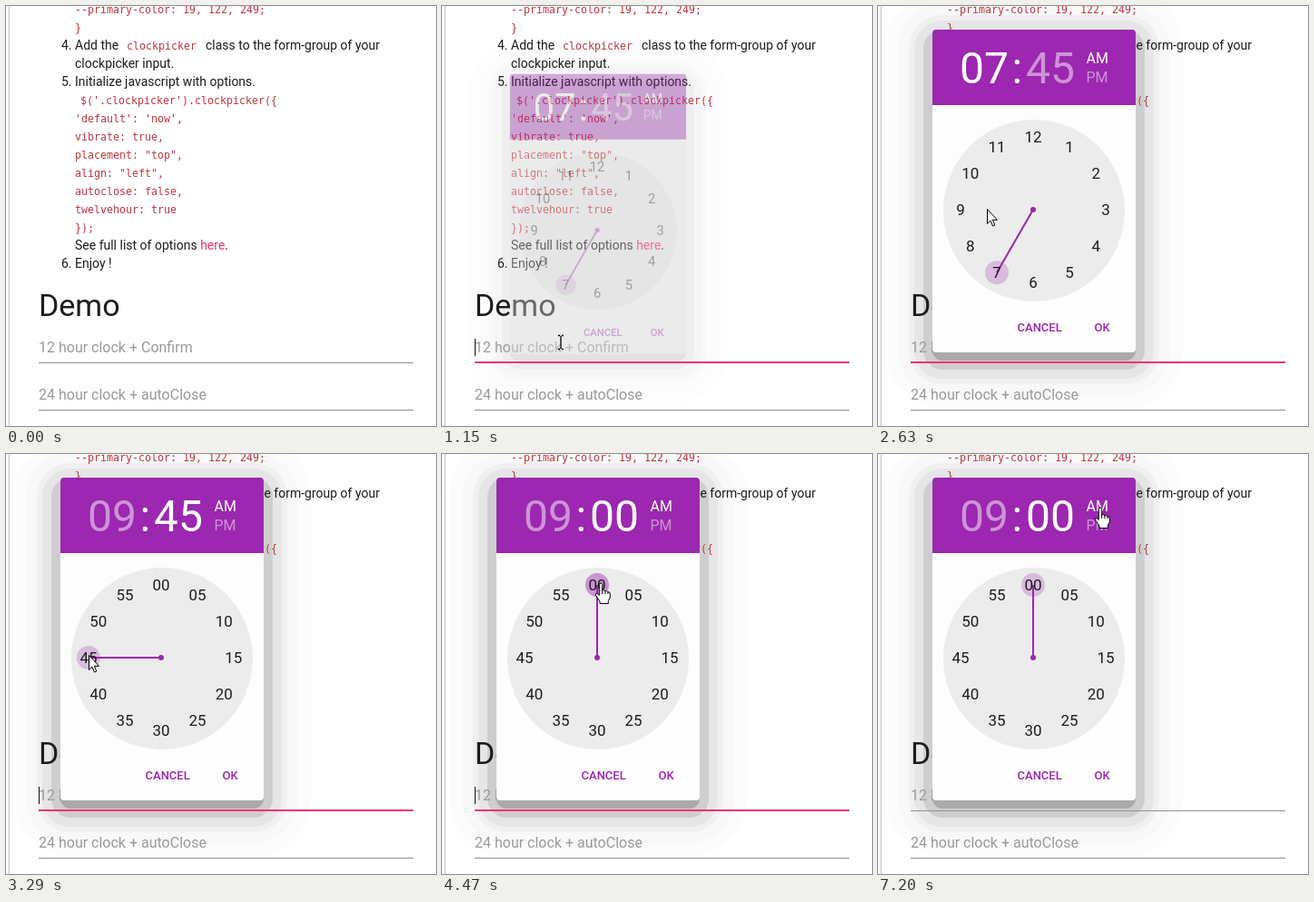
An HTML page for the animation above (8 s loop, 474 by 462 pixels).

```html
<!DOCTYPE html>
<html lang="en">
<head>
<meta charset="utf-8">
<title>Clock picker demo</title>
<style>
html, body { margin: 0; width: 100%; height: 100%; overflow: hidden; background: #fff; }
svg { display: block; width: 474px; height: 462px; font-family: Roboto, sans-serif; }
.list { font-size: 14px; fill: #1c1c1c; }
.code { font: 11.63px "DejaVu Sans Mono", monospace; fill: #bd383f; white-space: pre; }
.hint { font-size: 16px; fill: #999; }
.big { font-size: 48px; fill: #fff; }
.half { font-size: 16px; fill: #fff; }
.tick { font-size: 17px; fill: #1c1c1c; text-anchor: middle; }
.btn { font-size: 13px; font-weight: 500; fill: #9c27b0; }
</style>
</head>
<body>
<svg viewBox="0 0 474 462" xmlns="http://www.w3.org/2000/svg">
  <g id="shadow"></g>
  <path d="M2.5 0V462" stroke="#eee"/>
  <path d="M3.5 0V462" stroke="#ccc"/>
  <g id="code" class="code"></g>
  <g class="list">
    <text x="61" y="48">4.</text><text x="76" y="48">Add the</text>
    <text x="220" y="48">class to the form-group of your</text>
    <text x="76" y="68">clockpicker input.</text>
    <text x="61" y="88">5.</text><text x="76" y="88">Initialize javascript with options.</text>
    <text x="76" y="268">See full list of options <tspan fill="#ec2f73">here</tspan>.</text>
    <text x="61" y="288">6.</text><text x="76" y="288">Enjoy !</text>
  </g>
  <text x="36" y="341" font-size="34" fill="#1c1c1c">Demo</text>
  <g class="hint">
    <text x="36" y="381">12 hour clock + Confirm</text>
    <text x="36" y="433">24 hour clock + autoClose</text>
  </g>
  <path d="M36 392.5H449M36 444.5H449" stroke="#929292"/>
  <rect id="focus" y="391" height="2" fill="#f03573"/>
  <path id="caret" d="M36.5 366V385" stroke="#111"/>

  <g id="pop">
    <rect x="60" y="26" width="224" height="355" rx="4" fill="#fdfdfd"/>
    <path d="M60 109V30a4 4 0 0 1 4-4H280a4 4 0 0 1 4 4V109z" fill="#9c27b0"/>
    <text id="hour" class="big" x="90" y="85"></text>
    <text class="big" x="147.500" y="85">:</text>
    <text id="minute" class="big" x="163" y="85"></text>
    <text id="am" class="half" x="229.500" y="63">AM</text>
    <text id="pm" class="half" x="229.500" y="84">PM</text>
    <circle cx="172" cy="225" r="100" fill="#ececec"/>
    <circle id="hover" r="13" fill="#9c27b0" opacity=".25"/>
    <circle id="knob" r="13" fill="#9c27b0" opacity=".25"/>
    <path id="needle" stroke="#9c27b0" stroke-width="2"/>
    <circle cx="171" cy="224" r="3" fill="#9c27b0"/>
    <g id="hours" class="tick"></g>
    <g id="minutes" class="tick"></g>
    <text class="btn" x="153.500" y="358">CANCEL</text>
    <text class="btn" x="238.500" y="358">OK</text>
  </g>

  <g id="cursor" stroke-linejoin="round">
    <path id="beam" d="M-3-7.500H-.8M3-7.500H.8M0-7V7M-3 7.500H-.8M3 7.500H.8" stroke="#000" stroke-width="1.300"/>
    <path id="arrow" d="M.5.5V16.500L4 13.200L6.500 19L8.800 18L6.300 12.300H11.500Z" fill="#fff" stroke="#000"/>
    <path id="hand" d="M-1.700 13.500V1.700a1.700 1.700 0 0 1 3.400 0V8q2-1 3.200.8q2-.8 3 .9q2.400-.4 2.400 2.300V16l-2 3.500V22.500H-1V20L-5.500 13.500q-.6-2.400 1.400-2.300zM1.700 8V12M4.900 9V12M7.900 10V12" fill="#fff" stroke="#000"/>
  </g>
</svg>
<script>
const LOOP = 8000, CX = 171, CY = 224, R = 80;
const $ = id => document.getElementById(id);
const set = (id, attrs) => { for (const k in attrs) $(id).setAttribute(k, attrs[k]); };
const show = (id, on) => { $(id).style.display = on ? '' : 'none'; };
const ramp = (t, start, span) => Math.min(1, Math.max(0, (t - start) / span));
const smooth = p => p * p * (3 - 2 * p);
const zoom = (x, y, s) => `translate(${x} ${y}) scale(${s}) translate(${-x} ${-y})`;

function add(parent, tag, attrs, text) {
  const el = document.createElementNS('http://www.w3.org/2000/svg', tag);
  for (const k in attrs) el.setAttribute(k, attrs[k]);
  if (text) el.textContent = text;
  $(parent).append(el);
}

function spot(i) {
  const a = i * Math.PI / 6;
  return [CX + R * Math.sin(a), CY - R * Math.cos(a)];
}

add('code', 'text', { x: 76, y: 8 }, '--primary-color: 19, 122, 249;');
add('code', 'text', { x: 76, y: 28 }, '}');
add('code', 'text', { x: 133, y: 48 }, 'clockpicker');
["$('.clockpicker').clockpicker({", "'default': 'now',", 'vibrate: true,', 'placement: "top",',
  'align: "left",', 'autoclose: false,', 'twelvehour: true', '});'].forEach((line, i) =>
  add('code', 'text', { x: i ? 76 : 82, y: 107.5 + 20 * i }, line));

// Stepped shadow: [spread, grey]
[[52, '#fcfcfc'], [38, '#f8f8f8'], [26, '#f0f0f0'], [20, '#e6e6e6'], [10, '#cecece'], [0, '#aaa']].forEach(([s, fill]) =>
  add('shadow', 'rect', {
    x: 60 - s, y: 36 - s, width: 224 + 2 * s, height: 354 + 2 * s, rx: 11 + s, fill
  }));

for (let i = 0; i < 12; i++) {
  const [x, y] = spot(i);
  add('hours', 'text', { x, y: y + 6 }, String(i || 12));
  add('minutes', 'text', { x, y: y + 6 }, String(i * 5).padStart(2, '0'));
}

// Pointer path: time, x, y
const path = [
  [280, 430, 437], [490, 131, 370], [1790, 131, 370], [2200, 138, 302], [2620, 120, 223],
  [2680, 120, 223], [2850, 91, 221], [3850, 91, 221], [4200, 180, 147], [4330, 175, 142],
  [4590, 175, 142], [5210, 239, 82], [5850, 239, 82], [5910, 243, 72], [6050, 245, 60],
  [6400, 245, 60], [6430, 245, 59], [LOOP, 245, 59]
];

function pointer(t) {
  let i = 1;
  while (i < path.length - 1 && path[i][0] < t) i++;
  const [t0, x0, y0] = path[i - 1], [t1, x1, y1] = path[i];
  const p = smooth(ramp(t, t0, t1 - t0));
  return [x0 + (x1 - x0) * p, y0 + (y1 - y0) * p];
}

function draw(t) {
  const focused = t >= 660 && t < 5520;
  const half = 206.5 * smooth(ramp(t, 640, 300));
  show('focus', focused);
  set('focus', { x: 242.5 - half, width: 2 * half });
  show('caret', focused && (t < 1590 || Math.floor((t - 1590) / 517) % 2 === 1));

  const open = ramp(t, 1070, 240);
  const popup = { opacity: open, transform: zoom(172, 394, 0.8 + 0.2 * open) };
  for (const id of ['shadow', 'pop']) {
    show(id, open > 0);
    set(id, popup);
  }

  const nine = t >= 3010, zero = t >= 4470, pm = t >= 5520 && t < 7200;
  const swapped = t >= 3050, swap = 1 - (1 - ramp(t, 3050, 300)) ** 3;
  $('hour').textContent = nine ? '09' : '07';
  $('minute').textContent = zero ? '00' : '45';
  set('hour', { opacity: swapped ? 0.5 : 1 });
  set('minute', { opacity: swapped ? 1 : 0.5 });
  set('am', { opacity: pm ? 0.5 : 1 });
  set('pm', { opacity: pm ? 1 : 0.5 });
  set('hours', { opacity: 1 - swap, transform: zoom(CX, CY, 1 + 0.2 * swap) });
  set('minutes', { opacity: swap, transform: zoom(CX, CY, 0.8 + 0.2 * swap) });

  const [kx, ky] = spot(zero ? 0 : nine ? 9 : 7);
  set('knob', { cx: kx, cy: ky });
  set('needle', { d: `M${CX} ${CY}L${kx} ${ky}` });

  // Ticks ignore the pointer from the dial swap until it moves again
  const [x, y] = pointer(t);
  let over = null;
  if (!swapped || t > 3850) {
    for (let i = 0; i < 12; i++) {
      const [cx, cy] = spot(i);
      if (Math.hypot(x - cx, y - cy) < 13) over = { cx, cy };
    }
  }
  show('hover', over);
  if (over) set('hover', over);

  const link = over || (x > 226 && y < 88);
  show('cursor', t >= 280);
  set('cursor', { transform: `translate(${x} ${y})` });
  show('beam', t < 1310);
  show('arrow', t >= 1310 && !link);
  show('hand', t >= 1310 && link);
}

const begin = performance.now();
function tick() {
  draw((performance.now() - begin) % LOOP);
  requestAnimationFrame(tick);
}
tick();
</script>
</body>
</html>
```
